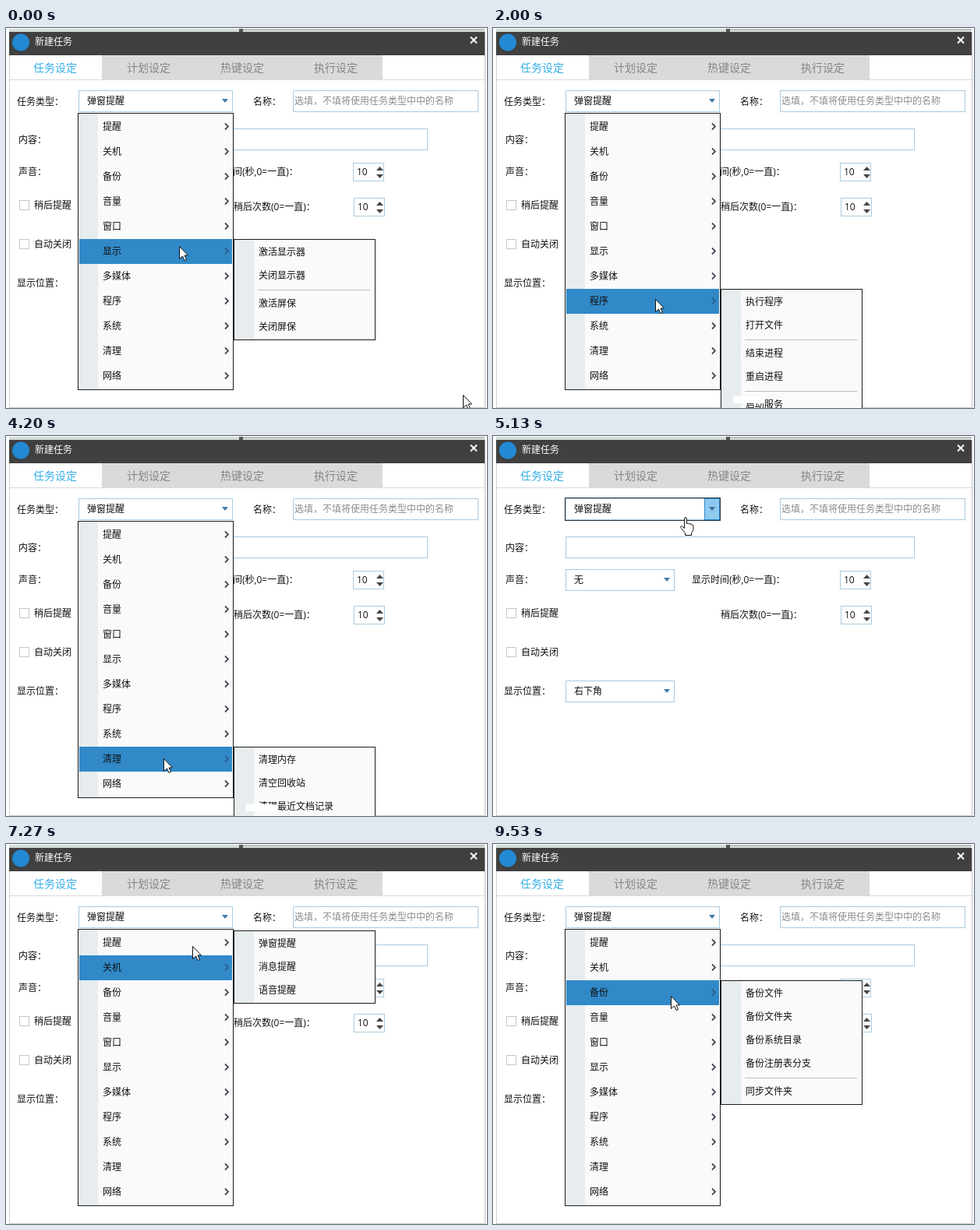
These frames come from a looping animation (617x488 px, 9740 ms). An HTML page with a canvas:

```html
<!DOCTYPE html>
<html lang="zh-CN">
<head>
<meta charset="utf-8">
<title>新建任务</title>
<style>
html, body { margin: 0; width: 100%; height: 100%; overflow: hidden; background: #fff; }
canvas { display: block; }
</style>
</head>
<body>
<canvas id="stage" width="617" height="488"></canvas>
<script>
const ctx = document.getElementById('stage').getContext('2d');
const LOOP = 9740;
const TICK = 66.7;
const BLUE = '#3189c8';
const FIELD = '#a9cbe0';

const MENU = ['提醒', '关机', '备份', '音量', '窗口', '显示', '多媒体', '程序', '系统', '清理', '网络'];
// '-' is a separator
const SUBMENUS = {
  0: ['弹窗提醒', '消息提醒', '语音提醒'],
  1: ['关机', '重启', '注销', '待机', '休眠', '锁定', '关机对话框'],
  2: ['备份文件', '备份文件夹', '备份系统目录', '备份注册表分支', '-', '同步文件夹'],
  5: ['激活显示器', '关闭显示器', '-', '激活屏保', '关闭屏保'],
  6: ['播放声音', '-', '屏幕截图', '屏幕录像', '-', '摄像头录像', '麦克风录音'],
  7: ['执行程序', '打开文件', '-', '结束进程', '重启进程', '-', '启动服务'],
  8: ['设置时间', '设置壁纸', '打开网址', '锁定键盘', '锁定鼠标'],
  9: ['清理内存', '清空回收站', '清理最近文档记录']
};

// moves: start, end, x, y
const POINTER = [
  [0, 0, 222, 280], [130, 270, 222, 287], [470, 530, 215, 318], [600, 600, 215, 319],
  [800, 1130, 214, 326], [1670, 2000, 208, 348], [2730, 2800, 206, 357],
  [3000, 3130, 204, 376], [3670, 4200, 202, 414], [5130, 5130, 240, 104],
  [5530, 5600, 243, 97], [6200, 6400, 241, 125], [7270, 7470, 234, 150],
  [8400, 8600, 231, 181], [9470, 9530, 228, 195]
];
const SECOND = [
  [0, 0, 586, 471], [130, 270, 583, 471], [800, 1130, 574, 471],
  [1400, 1400, 573, 471], [1670, 1730, 578, 471]
];
// changes: time, menu row
const ACTIVE = [[0, 5], [470, 6], [1870, 7], [3000, 8], [3930, 9], [5130, -1], [6200, 0], [7270, 1], [8470, 2]];
const OPEN = [[0, 5], [530, 6], [2000, 7], [3130, 8], [4200, 9], [5130, -1], [6400, 0], [7470, 1], [8600, 2]];

const rowAt = (track, t) => track.findLast(([start]) => start <= t)[1];

// Moves advance in whole ticks, the first one at the start time.
function positionAt(moves, t) {
  const i = moves.findLastIndex(([start]) => start <= t);
  const [start, end, x, y] = moves[i];
  const [, , fromX, fromY] = moves[Math.max(0, i - 1)];
  const steps = Math.round((end - start) / TICK) + 1;
  const p = Math.min(1, (Math.floor((t - start + 8) / TICK) + 1) / steps);
  return [Math.round(fromX + (x - fromX) * p), Math.round(fromY + (y - fromY) * p)];
}

function fill(x, y, w, h, color) {
  ctx.fillStyle = color;
  ctx.fillRect(x, y, w, h);
}

function outline(x, y, w, h, color) {
  ctx.strokeStyle = color;
  ctx.lineWidth = 1;
  ctx.strokeRect(x + .5, y + .5, w - 1, h - 1);
}

function text(str, x, midY, color = '#111', size = 12, align = 'left') {
  ctx.font = `${size}px "Open Sans", "Noto Sans CJK SC", "Noto Sans CJK", sans-serif`;
  ctx.textAlign = align;
  ctx.fillStyle = color;
  ctx.fillText(str, x, midY + Math.floor(size * .38));
}

function polyline(points, color, width) {
  ctx.beginPath();
  points.forEach(([x, y]) => ctx.lineTo(x, y));
  ctx.strokeStyle = color;
  ctx.lineWidth = width;
  ctx.stroke();
}

function triangle(x, y, half, height, color) {
  ctx.beginPath();
  ctx.moveTo(x - half, y);
  ctx.lineTo(x + half, y);
  ctx.lineTo(x, y + height);
  ctx.fillStyle = color;
  ctx.fill();
}

function field(x, y, w, h) {
  fill(x, y, w, h, '#fff');
  outline(x, y, w, h, FIELD);
}

function combo(x, y, w, label) {
  field(x, y, w, 28);
  text(label, x + 11, y + 14);
  triangle(x + w - 10, y + 11, 4, 5, '#3f7ba8');
}

function spinner(x, y, w) {
  field(x, y, w, 24);
  text('10', x + 5, y + 12);
  triangle(479.5, y + 10, 4.5, -5, '#444');
  triangle(479.5, y + 15, 4.5, 5, '#444');
}

function checkbox(y, label) {
  outline(17, y, 13, 13, '#c4c8ca');
  text(label, 36, y + 7);
}

function drawFrame() {
  fill(0, 0, 617, 488, '#fff');
  fill(4, 1, 610, 4, '#d3dbd9');
  fill(299, 1, 5, 4, '#555');
  fill(304, 1, 310, 2, '#b9bfbe');
  fill(4, 5, 610, 30, '#404040');
  ctx.beginPath();
  ctx.arc(19, 18.5, 11, 0, Math.PI * 2);
  ctx.fillStyle = '#2389d4';
  ctx.fill();
  text('新建任务', 37, 18, '#fff');
  polyline([[596, 11.5], [604, 19.5]], '#fff', 2);
  polyline([[604, 11.5], [596, 19.5]], '#fff', 2);

  fill(123, 35, 360, 32, '#d9dadc');
  ['任务设定', '计划设定', '热键设定', '执行设定'].forEach((label, i) =>
    text(label, 63 + 120 * i, 51, i ? '#858585' : '#35aee8', 14, 'center'));
  fill(4, 66, 610, 1, '#d9dadc');
  fill(4, 35, 1, 453, '#d0d0d0');
  fill(614, 5, 1, 483, '#bcbcbc');
  fill(4, 487, 611, 1, '#c8c8c8');
}

function drawForm(hover) {
  text('任务类型：', 14, 95);
  combo(93, 80, 198, '弹窗提醒');
  if (hover) {
    outline(92, 79, 200, 30, '#26343f');
    fill(271, 80, 20, 28, '#8fc9f0');
    outline(271, 80, 20, 28, BLUE);
    triangle(281, 91, 4, 5, '#3f6f96');
  }
  text('名称：', 317, 95);
  field(368, 80, 238, 28);
  text('选填，不填将使用任务类型中中的名称', 370, 94, '#8c8c8c');

  text('内容：', 16, 144);
  field(93, 129, 448, 28);
  text('声音：', 16, 185);
  combo(93, 171, 140, '无');
  text('显示时间(秒,0=一直)：', 255, 185);
  spinner(445, 173, 40);
  checkbox(221, '稍后提醒');
  text('稍后次数(0=一直)：', 292, 230);
  spinner(446, 218, 40);
  checkbox(271, '自动关闭');
  text('显示位置：', 14, 328);
  combo(93, 314, 140, '右下角');
}

function panel(x, y, w, h) {
  fill(x, y, w, h, '#fafafa');
  fill(x + 1, y + 1, 25, h - 2, '#e7edef');
  outline(x, y, w, h, '#1c1c1c');
}

function drawMenu(active) {
  panel(92, 109, 200, 356);
  MENU.forEach((label, i) => {
    const y = 127 + 32 * i;
    if (i === active) fill(94, y - 16, 196, 32, BLUE);
    text(label, 124, y);
    polyline([[281, y - 4.5], [285, y - .5], [281, y + 3.5]], i === active ? '#2a5f8c' : '#474b57', 1.8);
  });
}

function drawSubmenu(row) {
  const items = SUBMENUS[row];
  const step = label => label === '-' ? 6 : 30;
  const top = 111 + 32 * row;
  panel(292, top, 182, items.reduce((sum, label) => sum + step(label), 4));
  let y = top + 2;
  for (const label of items) {
    if (label === '-') fill(323, y + 3, 144, 1, '#bdbdbd');
    else text(label, 324, y + 15);
    y += step(label);
  }
}

function shape(path, [x, y]) {
  ctx.save();
  ctx.translate(x + .5, y + .5);
  ctx.fillStyle = '#fff';
  ctx.fill(path);
  ctx.strokeStyle = '#111';
  ctx.lineWidth = 1;
  ctx.stroke(path);
  ctx.restore();
}

const ARROW = new Path2D('M0 0V16L4 12.5L6.5 18L9 17L6.5 11.5H11Z');
const HAND = new Path2D('M5 14V2Q5 0 6.5 0T8 2V8Q11 6.5 11 8.5Q14 7.5 14 9.5Q16 9 16.5 11V16L14 20V23H6V20L1 14Q-1 11 2 11Z');

function draw(t) {
  const open = rowAt(OPEN, t);
  const hover = t >= 5130 && t < 6200;
  const closed = t >= 5130 && t < 6000;
  drawFrame();
  drawForm(hover);
  if (!closed) drawMenu(rowAt(ACTIVE, t));
  if (open >= 0) drawSubmenu(open);
  if (open >= 7) fill(308, 473, 41, 9, '#fff');
  if (t < 1870) shape(ARROW, positionAt(SECOND, t));
  shape(hover ? HAND : ARROW, positionAt(POINTER, t));
}

function tick() {
  draw(performance.now() % LOOP);
  requestAnimationFrame(tick);
}
tick();
</script>
</body>
</html>
```
